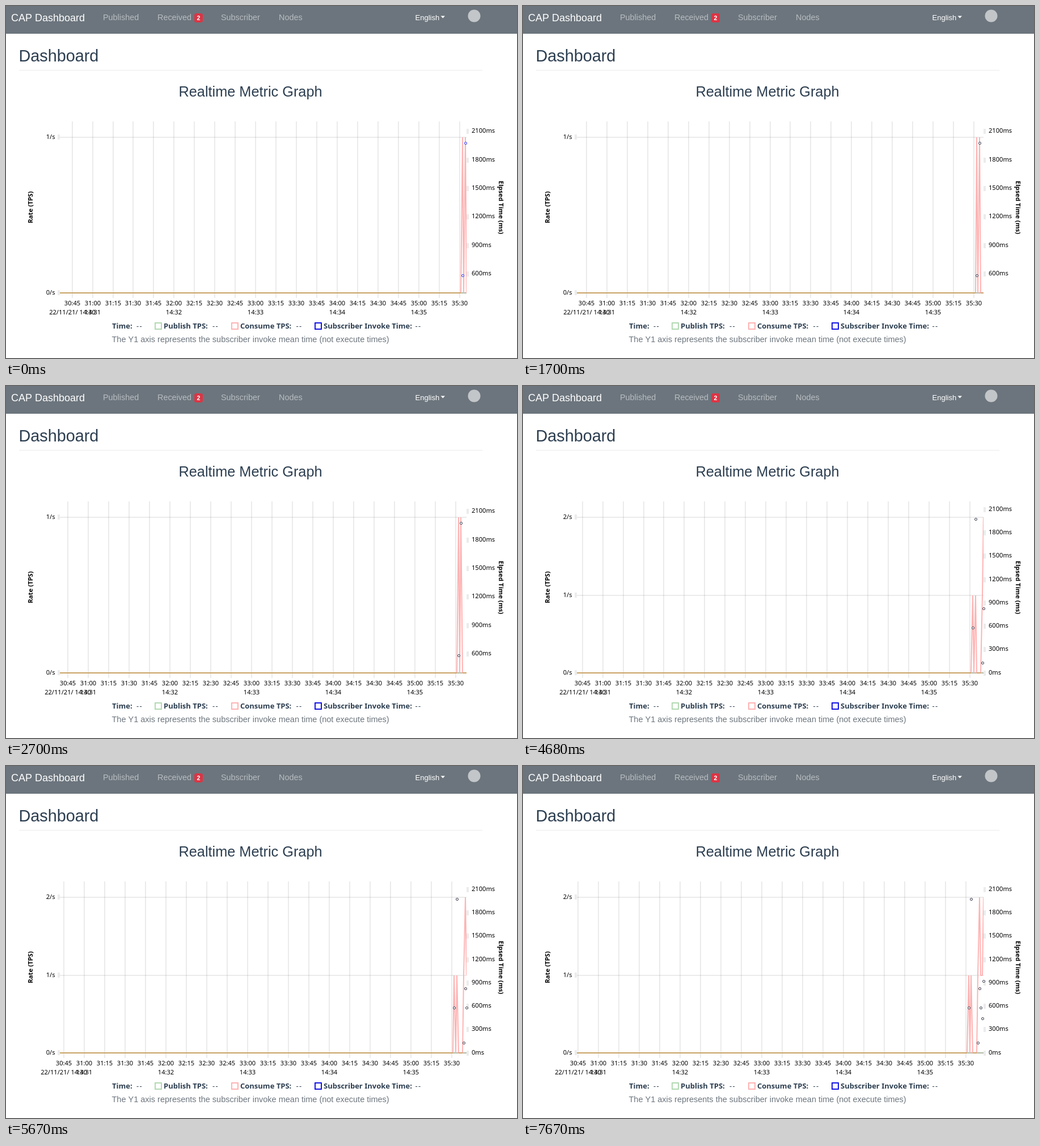
Recreate the animation shown at these times as an HTML page with a canvas. Size 901 by 622 pixels, loop 8 s.

```html
<!DOCTYPE html>
<html lang="en">
<head>
<meta charset="utf-8">
<title>Dashboard</title>
<style>
  html, body { margin: 0; width: 100%; height: 100%; overflow: hidden; background: #fff; }
  canvas { display: block; width: 901px; height: 622px; }
</style>
</head>
<body>
<canvas id="stage" width="901" height="622"></canvas>
<script>
const ctx = document.getElementById('stage').getContext('2d', { alpha: false });
const LOOP = 8000;
const STEPS = [0, 710, 1700, 2700, 3690, 4680, 5670, 6660, 7670];

const SANS = '"Liberation Sans", Arial, sans-serif';
const UI = '"Noto Sans", "Open Sans", sans-serif';
const INK = '#2c3e50';
const GRID = 'rgba(0,0,0,0.08)';

// Plot area; times are in seconds after 14:00
const L = 95, R = 812, TOP = 204, BASE = 507, SPAN = 299;
const START_END = 35 * 60 + 35;

const consume = new Map([[2132, 1], [2134, 1], [2139, 1], [2140, 2], [2141, 1], [2142, 1], [2143, 2]]);
const invoke = [[2132, 580], [2134, 1978], [2139, 128], [2140, 825], [2141, 580], [2142, 437], [2143, 918]];

function text(str, x, y, font, color, align = 'left') {
  ctx.font = font;
  ctx.fillStyle = color;
  ctx.textAlign = align;
  ctx.fillText(str, x, y);
}

function rect(x, y, w, h, color) {
  ctx.fillStyle = color;
  ctx.fillRect(x, y, w, h);
}

function turned(str, x, y, angle) {
  ctx.save();
  ctx.translate(x, y);
  ctx.rotate(angle);
  text(str, 0, 4, `bold 11.3px ${UI}`, '#000', 'center');
  ctx.restore();
}

function drawHeader() {
  rect(0, 0, 901, 49, '#6c757d');
  text('CAP Dashboard', 9, 27, `18px ${SANS}`, '#fff');
  const links = [['Published', 171], ['Received', 267], ['Subscriber', 379], ['Nodes', 481]];
  for (const [name, x] of links) text(name, x, 25, `14.4px ${SANS}`, '#b8bdc1');

  ctx.fillStyle = '#dc3545';
  ctx.beginPath();
  ctx.roundRect(332, 13, 15, 16, 3.5);
  ctx.fill();
  text('2', 339.5, 25, `bold 10.8px ${SANS}`, '#fff', 'center');

  text('English', 721.5, 24.5, `13px ${SANS}`, '#fff');
  ctx.beginPath();
  ctx.moveTo(766.5, 17.5);
  ctx.lineTo(774, 17.5);
  ctx.lineTo(770.25, 21.5);
  ctx.fill();

  ctx.fillStyle = '#c3c6c9';
  ctx.beginPath();
  ctx.arc(825.5, 17.5, 11, 0, Math.PI * 2);
  ctx.fill();

  text('Dashboard', 22.5, 98, `28.8px ${SANS}`, INK);
  rect(23, 113, 817, 1, '#ebebeb');
  text('Realtime Metric Graph', 431, 160, `25.3px ${SANS}`, INK, 'center');
}

function drawLegend() {
  const bold = `bold 13px ${UI}`;
  const items = [
    ['Time:', 187, 230],
    ['Publish TPS:', 278, 364, '#b2d9b2'],
    ['Consume TPS:', 413, 511.5, '#ffb3b3'],
    ['Subscriber Invoke Time:', 560, 721.5, '#1414e6']
  ];
  for (const [name, x, valueX, color] of items) {
    text(name, x, 569.5, bold, INK);
    text('-', valueX, 569.5, `13px ${UI}`, INK);
    text('-', valueX + 5.5, 569.5, `13px ${UI}`, INK);
    if (color) {
      ctx.strokeStyle = color;
      ctx.lineWidth = 2;
      ctx.strokeRect(x - 15, 560, 11, 11);
    }
  }
  text('The Y1 axis represents the subscriber invoke mean time (not execute times)',
    186.5, 594, `14.5px ${SANS}`, '#6c757d');
}

function drawChart(step) {
  const end = START_END + step;
  const label = `11.1px ${UI}`;
  const maxRate = step < 5 ? 1 : 2;
  const wide = step >= 4;
  const xOf = t => Math.round(R - (end - t) * (R - L) / SPAN);
  const rateY = v => Math.round(BASE - v / maxRate * 275);
  const msY = ms => wide ? 506.5 - ms * 0.1374 : 473 - (ms - 600) * 0.1677;
  const pad = n => String(n).padStart(2, '0');

  // Time axis
  for (let t = 1845; t <= 2130; t += 15) {
    const x = xOf(t), min = Math.floor(t / 60);
    rect(x - 1, TOP, 2, 312, GRID);
    text(`${min}:${pad(t % 60)}`, x, 528.5, label, '#000', 'center');
    if (t === 1845) text('22/11/21/ 14:30', x, 545, label, '#000', 'center');
    else if (t % 60 === 0) text(`14:${min}`, x, 545, label, '#000', 'center');
  }

  // Rate axis
  for (let v = 0; v <= maxRate; v++) {
    const y = rateY(v);
    rect(L, y - 1, R - L, 2, GRID);
    rect(91, y - 5, 4, 9, '#ececec');
    text(`${v}/s`, 86.5, y + 2.5, label, '#000', 'right');
  }

  // Elapsed time axis
  for (let ms = wide ? 0 : 600; ms <= 2100; ms += 300) {
    const y = msY(ms);
    rect(R, Math.round(y) - 4, 4, 9, '#ececec');
    text(`${ms}ms`, 821, y + 3, label, '#000');
  }
  turned('Rate (TPS)', 43, 355.5, -Math.PI / 2);
  turned('Elpsed Time (ms)', 873, 356, Math.PI / 2);

  // Series
  const rate = t => consume.get(t) || 0;
  ctx.save();
  ctx.beginPath();
  ctx.rect(L, TOP, R - L, BASE + 1 - TOP);
  ctx.clip();
  rect(L, BASE - 1, R - L, 2, '#b0b8a4');
  ctx.strokeStyle = '#ffb3b3';
  ctx.lineWidth = 2;
  ctx.lineJoin = 'bevel';
  ctx.beginPath();
  for (let t = end - SPAN; t <= end; t++) ctx.lineTo(xOf(t), rateY(rate(t)));
  ctx.stroke();
  for (let t = end - SPAN; t < end; t++) {
    if (!rate(t) && !rate(t + 1)) rect(xOf(t), BASE - 1, xOf(t + 1) - xOf(t), 2, '#c9a263');
  }
  ctx.restore();

  ctx.lineWidth = 1;
  ctx.strokeStyle = step === 0 ? '#2020e8' : '#29293f';
  ctx.fillStyle = '#fff';
  for (const [t, ms] of invoke) {
    if (t > end) continue;
    ctx.beginPath();
    ctx.arc(xOf(t) + 0.5, Math.round(msY(ms)) + 0.5, 2, 0, Math.PI * 2);
    ctx.fill();
    ctx.stroke();
  }
}

function frame() {
  const time = performance.now() % LOOP;
  const step = STEPS.filter(s => s <= time).length - 1;
  rect(0, 0, 901, 622, '#fff');
  drawHeader();
  drawChart(step);
  drawLegend();
  requestAnimationFrame(frame);
}
frame();
</script>
</body>
</html>
```
